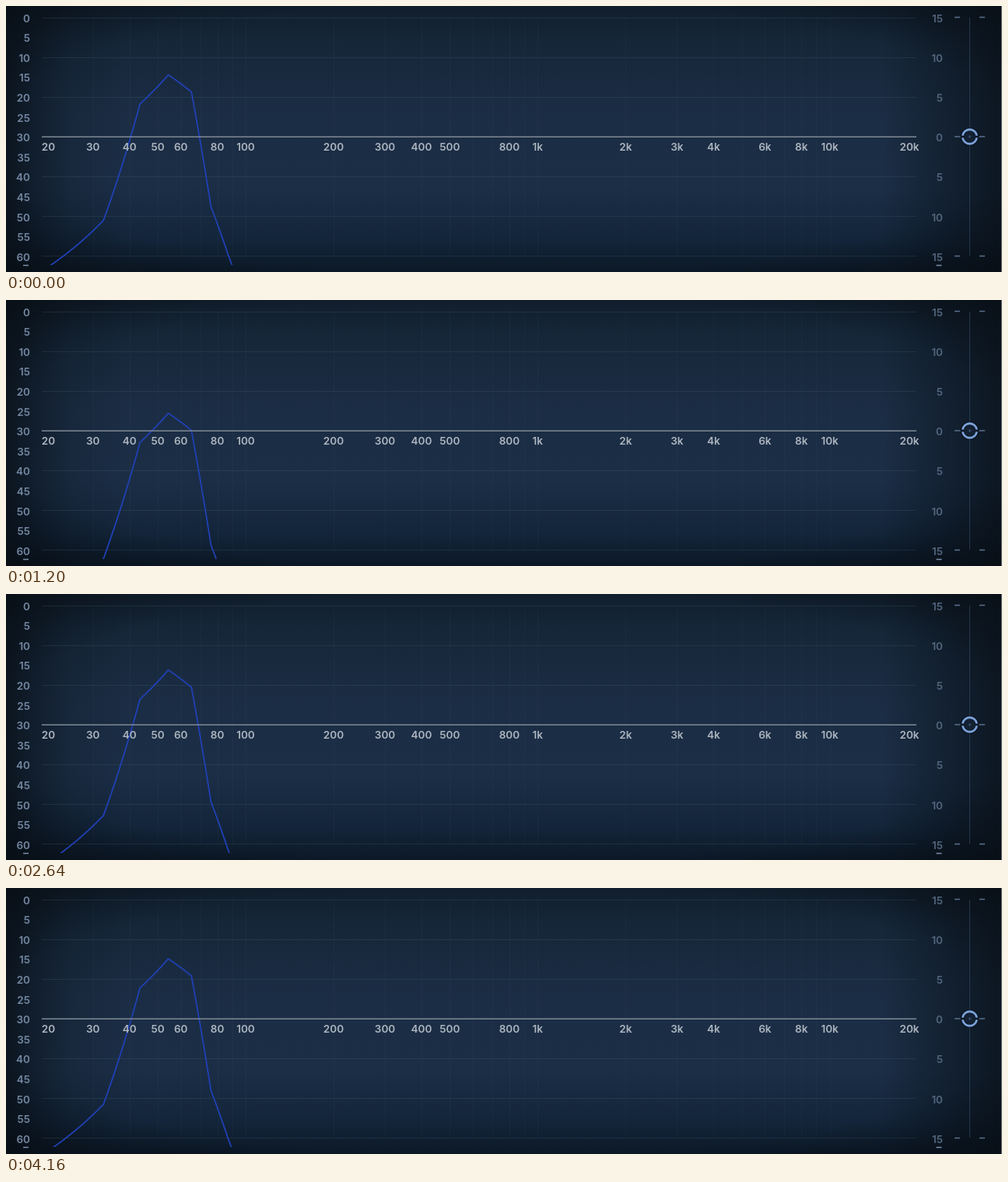
These frames come from a looping animation (1280 px wide and 342 px high, 4.2 s). An HTML page:

```html
<!DOCTYPE html>
<html lang="en">
<head>
<meta charset="utf-8">
<title>Spectrum analyser</title>
<style>
  html, body { margin: 0; width: 100%; height: 100%; overflow: hidden; background: #0c1622; }
  svg { display: block; width: 1280px; height: 342px; }
  text { font: 600 13.5px Inter, Roboto, sans-serif; }
  .level { fill: #7488a2; text-anchor: end; }
  .gain { fill: #53667e; text-anchor: end; }
  .freq { fill: #adb5bf; text-anchor: middle; }
  .curve { fill: none; stroke-width: 1.8; stroke-linejoin: round; }
</style>
</head>
<body>
<svg viewBox="0 0 1280 342">
  <defs>
    <linearGradient id="base" x2="0" y2="1">
      <stop offset="0" stop-color="#111e2c"/>
      <stop offset=".12" stop-color="#152638"/>
      <stop offset=".4" stop-color="#1b2d44"/>
      <stop offset=".68" stop-color="#1b2e46"/>
      <stop offset=".88" stop-color="#13253a"/>
      <stop offset="1" stop-color="#0c1826"/>
    </linearGradient>
    <linearGradient id="sides">
      <stop offset="0" stop-color="#080f16" stop-opacity=".8"/>
      <stop offset=".028" stop-color="#080f16" stop-opacity=".5"/>
      <stop offset=".065" stop-color="#080f16" stop-opacity=".18"/>
      <stop offset=".12" stop-color="#080f16" stop-opacity="0"/>
      <stop offset=".88" stop-color="#080f16" stop-opacity="0"/>
      <stop offset=".935" stop-color="#080f16" stop-opacity=".35"/>
      <stop offset="1" stop-color="#080f16" stop-opacity=".75"/>
    </linearGradient>
    <radialGradient id="corners" r=".72">
      <stop offset=".72" stop-color="#070d14" stop-opacity="0"/>
      <stop offset="1" stop-color="#070d14" stop-opacity=".6"/>
    </radialGradient>
    <clipPath id="plot"><rect x="46" width="1124" height="333"/></clipPath>
  </defs>
  <rect width="1280" height="342" fill="url(#base)"/>
  <rect width="1280" height="342" fill="url(#sides)"/>
  <rect width="1280" height="342" fill="url(#corners)"/>
  <path d="M1279.5 0V342" stroke="#74777b"/>

  <g id="grid" stroke="#4a6a78"></g>
  <g clip-path="url(#plot)">
    <path id="tone" class="curve" stroke="#2040b4"/>
    <path id="kick" class="curve" stroke="#a32f42"/>
  </g>
  <path d="M46 168.3H1170" stroke="#7f8994" stroke-width="1.4"/>
  <g id="labels"></g>

  <path d="M22 333.5h7M1195.5 333.5h7" stroke="#7a8ea8" stroke-width="1.6"/>
  <path d="M1238.5 15V321" stroke="#26384c"/>
  <path d="M1219 14.5h7m25 0h7M1219 321.5h7m25 0h7M1219 168h8m23 0h8" stroke="#596f8c" stroke-width="1.6"/>
  <circle cx="1238.5" cy="168" r="12" fill="#0c1724"/>
  <circle cx="1238.5" cy="168" r="7" fill="#132133"/>
  <path d="M1229.4 166.6a9.2 9.2 0 0 1 18.2 0M1229.4 169.4a9.2 9.2 0 0 0 18.2 0" fill="none" stroke="#7ba2da" stroke-width="2.8"/>
  <path d="M1236.5 168h4m-2-2v4" stroke="#3c5470"/>
</svg>

<script>
const LOOP = 4200, STEP = 40, LEFT = 46, RIGHT = 1170, FLOOR = 333;
const HIT = 400, CREST = 480;
const BIN_HZ = 44100 / 4096, TONE_BIN = 5;

const byId = id => document.getElementById(id);

function add(parent, tag, attrs, content = '') {
  const node = document.createElementNS('http://www.w3.org/2000/svg', tag);
  for (const name in attrs) node.setAttribute(name, attrs[name]);
  node.textContent = content;
  byId(parent).append(node);
}

const DECADE = 375.3, X_100HZ = 308;
const freqX = hz => X_100HZ + DECADE * Math.log10(hz / 100);
const binAt = x => 100 / BIN_HZ * 10 ** ((x - X_100HZ - 1.5) / DECADE);

// Axes
const label = (kind, x, y, content) => add('labels', 'text', { class: kind, x, y: y + 5 }, content);
const line = (d, opacity) => add('grid', 'path', { d, opacity });

for (let db = 0; db <= 60; db += 5) {
  const y = 15.5 + 5.12 * db;
  label('level', 31, y, db);
  if (db % 10 === 0) {
    label('gain', 1204, y, Math.abs(db - 30) / 2);
    line(`M${LEFT} ${15.5 + 5.1 * db}H${RIGHT}`, .24);
  }
}
for (const name of '20 30 40 50 60 80 100 200 300 400 500 800 1k 2k 3k 4k 6k 8k 10k 20k'.split(' ')) {
  const hz = parseFloat(name) * (name.endsWith('k') ? 1000 : 1);
  label('freq', Math.min(1161, Math.max(54.5, freqX(hz))), 181, name);
}
for (let hz = 30; hz < 20000; hz += 10 ** Math.floor(Math.log10(hz))) {
  line(`M${Math.round(freqX(hz)) + .5} 15V321`, .08);
}

// Spectra: heights by analyser bin, joined by straight lines in frequency.
function spectrum(keys) {
  return bin => {
    const i = Math.max(1, keys.findIndex(([b]) => b >= bin));
    const [b0, y0] = keys[i - 1], [b1, y1] = keys[i];
    return y0 + (y1 - y0) * (bin - b0) / (b1 - b0);
  };
}
const fromBinOne = heights => heights.map((y, i) => [i + 1, y]);

const sineLobe = spectrum([...fromBinOne([388, 332, 275.5, 126, 88.5, 110.5, 258, 319, 372]), [2000, 9000]]);
const burstLobe = spectrum(fromBinOne([237, 225, 197, 158, 127, 146, 187, 217]));
const burstTail = bin => 171.4 + 41.5 * Math.log(bin - TONE_BIN);
const burstY = bin => bin < 8 ? burstLobe(bin) : burstTail(bin);
const kickY = spectrum([[1, 293], [2, 262], [3, 210], [4, 150], [5, 138], [6, 161], [7, 191],
  [9, 214], [11, 225], [14, 228], [19, 250], [27, 296], [30, 303], [35, 304],
  [42, 320], [46, 326], [53, 324], [57, 333], [2000, 4000]]);

function trace(id, yAt) {
  let d = '';
  for (let x = LEFT; x <= RIGHT; x += .5) {
    const y = Math.min(yAt(binAt(x)), FLOOR + 30);
    d += (d ? 'L' : 'M') + x + ' ' + y.toFixed(1);
  }
  byId(id).setAttribute('d', d);
}

// Fast attack up to the crest, then a steady fall.
function burstShift(t, speed) {
  if (t < HIT) return 1000;
  return speed * (Math.max(t, CREST) - 600) + Math.max(0, CREST - t) * 3;
}

// The tone is ducked by the kick and recovers exponentially.
const duck = t => t < CREST ? 0 : 1.5 + 55.5 * Math.exp((1200 - t) / 730);

function draw(now) {
  const t = Math.floor(now % LOOP / STEP) * STEP;
  const sineShift = duck(t), toneShift = burstShift(t, .3), kickShift = burstShift(t, .4);
  trace('tone', bin => Math.min(sineLobe(bin) + sineShift, burstY(bin) + toneShift));
  trace('kick', bin => kickY(bin) + kickShift);
}

const start = performance.now();
function frame() {
  draw(performance.now() - start);
  requestAnimationFrame(frame);
}
frame();
</script>
</body>
</html>
```
